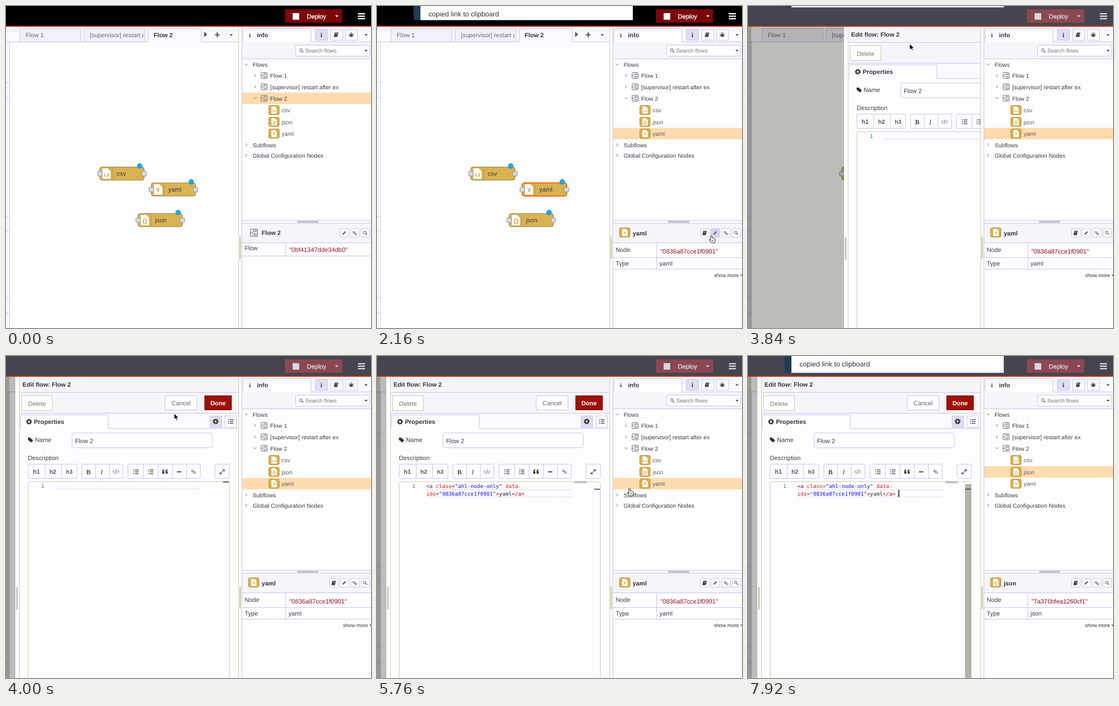
These frames come from a looping animation (666x588 px, 8 s). An HTML page:

```html
<!DOCTYPE html>
<html lang="en">
<head>
<meta charset="utf-8">
<title>Flow editor</title>
<style>
html, body { margin: 0; width: 100%; height: 100%; overflow: hidden; background: #fdfdff; }
svg { display: block; }
text { font-family: "Liberation Sans", Arial, sans-serif; white-space: pre; text-rendering: geometricPrecision; }
.mono { font-family: "DejaVu Sans Mono", monospace; }
.serif { font-family: "Liberation Serif", serif; }
</style>
</head>
<body>
<script>
const LINE = '#c6c4f0', OLIVE = '#cdcda6', BAR = '#f5f5fc', PAPER = '#fdfdff', INK = '#3c3c48', AMBER = '#d9b252';

// Drawing helpers, each returns SVG markup
const rect = (x, y, w, h, fill, stroke = 'none', rx = 0, more = '') =>
  `<rect x="${x}" y="${y}" width="${w}" height="${h}" fill="${fill}" stroke="${stroke}" rx="${rx}" ${more}/>`;
const text = (x, y, s, size = 11.2, fill = INK, more = '') =>
  `<text x="${x}" y="${y}" font-size="${size}" fill="${fill}" ${more}>${s}</text>`;
const bold = (x, y, s, size = 11.2, fill = '#333340', more = '') => text(x, y, s, size, fill, 'font-weight="bold" ' + more);
const line = (d, stroke = LINE, w = 1, more = '') => `<path d="${d}" fill="none" stroke="${stroke}" stroke-width="${w}" ${more}/>`;
const shape = (d, fill = INK) => `<path d="${d}" fill="${fill}"/>`;
const group = (id, ...parts) => `<g id="${id}">${parts.join('')}</g>`;
const at = (x, y, ...parts) => `<g transform="translate(${x} ${y})">${parts.join('')}</g>`;
const MID = 'text-anchor="middle"';

const caretDown = (x, y, fill = '#555') => shape(`M${x - 3} ${y - 1.5}h6l-3 3.5z`, fill);
const chevron = (x, y, open) => line(open ? `M${x - 2.5} ${y - 1.5}l2.5 2.5l2.5-2.5` : `M${x - 1.5} ${y - 2.5}l2.5 2.5l-2.5 2.5`, '#666');
const lens = (x, y) => `<circle cx="${x}" cy="${y}" r="2.5" fill="none" stroke="#555"/>` + line(`M${x + 2} ${y + 2}l2.5 2.5`, '#555', 1.3);
const book = (x, y) => shape(`M${x - 2.5} ${y - 4}h6.5l-2 8h-6.5z`, '#444') + line(`M${x - 1} ${y - 1.5}h3.5`, '#fff', .8);
const pencil = (x, y) => line(`M${x - 2.5} ${y + 2.5}l5-5`, '#444', 2);
const link = (x, y) => rect(x - 3.5, y - 3, 3.4, 3.4, 'none', '#555', 1.5) + rect(x + .3, y + .2, 3.4, 3.4, 'none', '#555', 1.5) + line(`M${x - 1} ${y - .7}l2.2 2`, '#555');
const bullets = (x, y) => [-3.5, 0, 3.5].map(d => line(`M${x - 5} ${y + d}h1.8m1.4 0h6.8`, '#555', 1.4)).join('');
const gear = (x, y) => `<circle cx="${x}" cy="${y}" r="3" fill="none" stroke="#333" stroke-width="2.2"/>` +
  `<circle cx="${x}" cy="${y}" r="4.5" fill="none" stroke="#333" stroke-width="1.6" stroke-dasharray="1.8 1.73"/>`;
const flowIcon = (x, y, s = 1) => `<g transform="translate(${x} ${y}) scale(${s})">` +
  rect(-5.5, -5.5, 11, 11, 'none', '#6a6a72', 1) +
  line('M0-3.5h3.5v2h-3.5zM0 1.5h3.5v2h-3.5zM-5.5 0h2q1.5 0 1.5-1.5q0-1 2-1M-3.5 0q1.5 0 1.5 1.5q0 1 2 1', '#6a6a72', .8) + '</g>';
const GLYPH = { csv: '1,2', json: '{}', yaml: 'Y' };
const sheet = (x, y, w, h, type) => shape(`M${x} ${y}h${w * .65}l${w * .35} ${h * .28}v${h * .72}h${-w}z`, '#fff') +
  bold(x + w / 2, y + h * .75, GLYPH[type], h * (type == 'csv' ? .42 : .58), '#c09a38', MID);
const typeIcon = (x, y, type) => rect(x - 9.5, y - 8.5, 19, 17, AMBER, '#b8933c', 2.5) + sheet(x - 4.5, y - 6.5, 9.5, 13, type);

function node(x, y, type) {
  const port = px => rect(px, 8, 8.5, 8.5, '#d9d9dc', '#8f8f98', 2);
  return at(x, y, rect(0, 0, 81, 24, AMBER, '#8f7c45', 4, `id="node-${type}"`),
    line('M23.5 0v24', '#a98b3c', 1, 'stroke-dasharray="2 1"'), sheet(5, 2.5, 15, 19, type),
    port(-4), port(76.5), text(31, 16, type, 11.4),
    '<circle cx="73" cy="-2" r="4.2" fill="#00b4ff" stroke="#2378b4"/>');
}

const header = rect(0, 0, 666, 37, '#000') +
  rect(509, 6, 104.5, 24.5, '#7c0507', 'none', 1) + rect(587, 6, 1, 24.5, '#650406') +
  rect(523, 13, 12, 12, '#fff') + text(549, 22.5, 'Deploy', 11.3, '#fff', 'stroke="#fff" stroke-width=".35"') +
  caretDown(603.5, 18.5, '#fff') + [13, 17.5, 22].map(y => rect(642, y, 13, 2.3, '#fff')).join('');

const workspace = rect(0, 38, 424, 550, PAPER) + rect(0, 66, 6, 522, '#f8f8fd') +
  line('M6.5 66V588M0 139.5h6M0 167.5h6M0 384.5h6M0 410.5h6M0 532.5h6M0 560.5h6', '#c9c9f2') +
  rect(0, 38, 424, 27, '#fafaff') +
  rect(25.5, 41.5, 111, 24, '#f1f1fb', LINE) + text(36, 57, 'Flow 1', 11.2, '#686876') +
  rect(142.5, 41.5, 111, 24, '#f1f1fb', LINE) +
  `<svg x="142" y="41" width="109" height="25">${text(11, 16, '[supervisor] restart after', 11.1, '#686876')}</svg>` +
  line('M0 65.5H259.5V41.5H356.5V65.5H424') + bold(269.5, 57, 'Flow 2') +
  shape('M361.5 47l5.5 5l-5.5 5z', '#555') + line('M381 52.5h9M385.5 48v9', '#555', 2.2) + caretDown(411, 53) +
  node(171, 294, 'csv') + node(265, 323, 'yaml') + node(241, 379, 'json');

const dim = group('dim', rect(0, 38, 424, 550, '#141400', 'none', 0, 'opacity=".28"'), rect(0, 38, 6, 550, '#141400', 'none', 0, 'opacity=".2"'));

const field = (x, w, cells, draw) =>
  rect(x + .5, 197.5, w, 26, PAPER, LINE, 1) + cells.map(c => line(`M${c + .5} 197.5v26`)).join('') + draw;
const quote = x => shape(`M${x} 211q0-4 4-4v1.5q-2 .4-2 2h2v4.5h-4z`, '#444');
const tools = field(40, 89, [71, 101], ['h1', 'h2', 'h3'].map((h, i) => bold(55.5 + 30 * i, 215, h, 11 - .4 * i, '#555', MID)).join('')) +
  field(138, 75, [163, 188], text(150.5, 215.5, 'B', 12, '#444', MID + ' class="serif" font-weight="bold"') +
    text(174.5, 215.5, 'I', 12.5, '#444', MID + ' class="serif" font-style="italic"') + line('M198 208.5l-3 3l3 3M203 208.5l3 3l-3 3M201.5 207.5l-2 8', '#555')) +
  field(222, 132, [250, 277, 303, 329], bullets(237, 211.5) + bullets(264, 211.5) +
    quote(285) + quote(291) + line('M312 211.5h8', '#444', 2) + link(342, 211)) +
  field(381, 26, [], line('M391 215l7-7M395 207.5h3.5v3.5M390.5 212v3.5h3.5', '#555', 1.1));

const RED = '#dc1414', BLUE = '#1414e6';
const span = (s, c) => `<tspan fill="${c}">${s}</tspan>`;
const mono = (y, s) => text(90, y, s, 9.6, '#8a0c14', 'class="mono"');
const dash = (...ys) => ys.map(y => line(`M91 ${y}H355`, LINE, 1, 'stroke-dasharray="3 1.5"')).join('');
const code = mono(240.5, '&lt;a ' + span('class', RED) + span('=', '#333') + span('"ahl-node-only"', BLUE) + ' ' + span('data-', RED)) +
  mono(254.5, span('ids', RED) + span('=', '#333') + span('"0836a87cce1f0901"', BLUE) + '&gt;' + span('yaml', '#222') + '&lt;/a&gt;');

const tray = rect(17, 38, 408, 550, PAPER) + line('M24.5 38V588', OLIVE) + rect(18.5, 422, 3, 41, '#c4c4c4', 'none', 1) +
  rect(25, 38, 399, 66, BAR) + line('M24 66.5H424M24 104.5H424') + bold(30, 56, 'Edit flow: Flow 2') +
  rect(28.5, 72.5, 56, 27, PAPER, OLIVE) + text(56.5, 90.5, 'Delete', 11.2, '#777', MID) +
  rect(290.5, 72.5, 58, 26, PAPER, LINE) + text(319.5, 90, 'Cancel', 11.2, '#666', MID) +
  rect(362, 72, 50, 27, '#9c1008') + bold(387, 90, 'Done', 11.2, '#fff', MID) +
  rect(25, 105, 399, 27, '#fafaff') + shape('M26 132V107H186V133H26z', PAPER) + line('M26.5 132.5V107.5H186.5V132.5H424') +
  gear(42, 120) + bold(51, 124, 'Properties') +
  rect(372.5, 109.5, 21, 21, '#dedef0', LINE) + gear(382.5, 119.5) + rect(399.5, 109.5, 21, 21, PAPER, LINE) + bullets(410, 119.5) +
  shape('M40 149h4l5.5 5l-3.5 4l-6-5z', '#333') + text(53, 157, 'Name') +
  rect(120.5, 140.5, 256, 27, PAPER, LINE, 3) + text(126, 158.5, 'Flow 2') + text(40, 190, 'Description') + tools +
  rect(40.5, 229.5, 367, 380, PAPER, OLIVE, 4) + text(64, 240.5, '1', 9.6, '#237893', 'class="mono"') +
  group('empty', dash(229.5, 243), rect(396, 229, 11, 2, '#555560')) +
  group('filled', dash(244.5, 257.5), code,
    rect(360, 229, 23, 1, '#7c7cc0') + rect(360, 231, 23, 1, '#a89060'),
    rect(396, 234, 11, 354, '#b3b3ac', 'none', 0, 'id="scroll"'), rect(396, 242.5, 11, 1.5, '#45453c')) +
  rect(0, 0, 1.5, 13, '#000', 'none', 0, 'id="caret"');

const tabButton = (x, on, icon) => rect(x + .5, 42.5, 22, 20, on ? '#dedef2' : PAPER, LINE) + icon;
const row = (y, open, label) => chevron(454.5, y, open) + flowIcon(471, y) + text(482, y + 4, label, 10.5);
const leaf = (y, type) => typeIcon(489, y, type) + text(503, y + 4, type, 10.5, '#5c5c68');
const smallButton = (id, x, icon) => group(id, rect(x + .5, 406.5, 15.5, 15.5, PAPER, '#c9c9dc', 1), icon(x + 8, 414.5));

const detail = (type, hash) => group('detail-' + type,
  typeIcon(452, 413.5, type), bold(466.5, 419, type), smallButton('read-' + type, 590, book),
  line('M431 459.5H666M431 480.5H666M510.5 433V480'),
  text(435.5, 449, 'Node'), text(517, 452, `"${hash}"`, 11.4, '#9c1020'),
  text(435.5, 474, 'Type'), text(515.5, 474, type), text(615, 495, 'show more', 9.3, '#333'), caretDown(666, 492));

const sidebar = rect(424, 38, 242, 550, PAPER) + line('M424.5 38V588', OLIVE) + line('M430.5 38V588') + rect(426, 421, 2.5, 41, '#c9c9a6', 'none', 1) +
  rect(431, 38, 235, 27, '#fafaff') + shape('M432 66V41h124v25z', PAPER) + line('M432.5 65.5V41.5H556.5V65.5H666') +
  bold(443.5, 57, 'i', 11, '#333', 'class="serif"') + bold(458, 57, 'info', 11) +
  tabButton(564, true, bold(575.5, 57, 'i', 12, '#333', MID + ' class="serif"')) + tabButton(592, false, book(602.5, 52.5)) +
  tabButton(619, false, shape('M627.5 51h5v4q-2.5 3-5 0zM628 50q2-3.5 4 0z', '#444') + line('M625.5 50l9 6M634.5 50l-9 6M625 53h10', '#444', .8)) + caretDown(657, 53) +
  rect(431, 66, 235, 30, BAR) + line('M431 96.5H666') + rect(528.5, 71.5, 135, 20, PAPER, LINE, 2) +
  lens(538, 80.5) + text(546, 85, 'Search flows', 10, '#777') + caretDown(657, 81.5) +
  rect(431, 0, 235, 21, '#ffdcae', 'none', 0, 'id="mark"') +
  chevron(438.5, 107, true) + text(450, 111, 'Flows', 10.5) + row(127, false, 'Flow 1') + row(147.5, false, '[supervisor] restart after ex') + row(168.5, true, 'Flow 2') +
  leaf(190, 'csv') + leaf(211.5, 'json') + leaf(233, 'yaml') +
  chevron(438.5, 253.5, false) + text(450, 257.5, 'Subflows', 10.5) + chevron(438.5, 272.5, false) + text(450, 276.5, 'Global Configuration Nodes', 10.5) +
  line('M431 391.5H666M431 396.5H666') + rect(531, 392.5, 39, 3, '#bcbcbc', 'none', 1) +
  rect(431, 397, 235, 35, BAR) + line('M431 432.5H666') +
  smallButton('edit', 609, pencil) + smallButton('copy', 628.5, link) + smallButton('find', 647.5, (x, y) => lens(x - 1, y - 1)) +
  group('detail-flow', flowIcon(452.5, 414, 1.15), bold(466.5, 418, 'Flow 2'), line('M431 456.5H666M510.5 433V456'),
    text(435.5, 446, 'Flow'), text(517, 449, '"0bf41347dde34db0"', 11.4, '#9c1020')) +
  detail('yaml', '0836a87cce1f0901') + detail('json', '7a376bfea1260cf1');

const note = group('note', rect(67, -4, 13, 35, '#1f3c50', 'none', 0, 'class="card"'),
  rect(79.5, -4, 387, 34.5, PAPER, LINE, 0, 'class="card"'), text(94, 18.5, 'copied link to clipboard', 12.65, '#333'));

const pointers = group('pointer',
  group('arrow', '<path d="M0 0v11l2.6-2.4l1.8 4l1.8-.8l-1.8-3.9h3.5z" fill="#000" stroke="#fff" stroke-width=".8"/>'),
  group('hand', '<path d="M-1.3 1q1.3-2 2.6 0v4q1.4-1 2 .3q1.3-.8 2 .5q1.4-.3 1.7 1v3.2l-1.2 3.5h-5.5l-3.5-4.5q-1.2-2 .4-2l1.5 1.5z" fill="#fff" stroke="#222"/>' + line('M1.3 8v3M3.3 8v3', '#222', .8)),
  group('beam', line('M-2.5-6q2.5 0 2.5 2v8q0 2-2.5 2M2.5-6q-2.5 0-2.5 2v8q0 2 2.5 2M-1.5 1h3', '#222')));

document.body.innerHTML = `<svg width="666" height="588" viewBox="0 0 666 588">${
  workspace + dim + group('tray', tray) + sidebar + header +
  rect(0, 0, 666, 37, '#a0a0b4', 'none', 0, 'id="shade" opacity=".43"') + rect(0, 36, 666, 2, '#c8361c') + note + pointers}</svg>`;

const LOOP = 8000, STEP = 80;
const PICK_YAML = 1040, PICK_JSON = 6160, OPEN = 3680, FOCUS = 4560, PASTE = 4800, REFOCUS = 7680, SPACE = 7840;
// time, x, y of the mouse
const PATH = [[80, 400, 560], [800, 306, 340], [1040, 306, 340], [1680, 636, 416], [1920, 636, 416], [2160, 610, 419],
  [2720, 606, 413], [3440, 291, 57], [3760, 291, 57], [4000, 307, 105], [4480, 310, 337], [5440, 310, 337],
  [5920, 511, 210], [6240, 511, 210], [6560, 664, 419], [6880, 637, 415], [7200, 637, 415], [7680, 300, 330], [8000, 300, 330]];
const $ = id => document.getElementById(id);
const show = (id, on) => $(id).style.display = on ? '' : 'none';
const move = (id, x, y) => $(id).setAttribute('transform', `translate(${x} ${y})`);
const ramp = (t, from, to) => Math.min(1, Math.max(0, (t - from) / (to - from)));
const ease = u => (1 - Math.cos(Math.PI * u)) / 2;
const cards = document.querySelectorAll('.card');

function mouse(t) {
  const i = Math.max(1, PATH.findIndex(k => k[0] >= t));
  const [a, b] = [PATH[i - 1], PATH[i]], u = ease(ramp(t, a[0], b[0]));
  return [a[1] + (b[1] - a[1]) * u, a[2] + (b[2] - a[2]) * u];
}

function render(t) {
  const picked = t < PICK_YAML ? 'flow' : t < PICK_JSON ? 'yaml' : 'json';
  for (const k of ['flow', 'yaml', 'json']) show('detail-' + k, k == picked);
  $('mark').setAttribute('y', { flow: 158, yaml: 222.5, json: 201 }[picked]);
  $('node-yaml').setAttribute('stroke', picked == 'yaml' ? '#ff6a14' : '#8f7c45');
  $('node-yaml').setAttribute('stroke-width', picked == 'yaml' ? 2 : 1);

  const slide = ease(ramp(t, OPEN, OPEN + 280)), open = slide > 0;
  show('tray', open); show('dim', open); show('shade', open);
  move('tray', 407 * (1 - slide), 0);

  const down = ramp(t, 1920, 2080) - ramp(t, 3680, 3920) + ramp(t, 7120, 7360);
  show('note', down > 0);
  move('note', 0, -35 * (1 - down));
  for (const c of cards) c.setAttribute('height', t < PASTE ? 29.5 : 34.5);

  const [x, y] = mouse(t), seen = t >= 80 && t < SPACE;
  const inCode = slide == 1 && x > 40 && x < 408 && y > 229;
  const over = left => seen && y > 405 && y < 424 && x >= left && x < left + 16;
  const hot = { edit: over(609), copy: over(628.5), find: over(647.5) };
  for (const id in hot) $(id).firstChild.setAttribute('fill', hot[id] ? '#d4d4ee' : PAPER);
  const hand = hot.edit || hot.copy || hot.find || !open && y < 66 || x > 431 && y > 97 && y < 280;
  show('pointer', seen);
  show('beam', inCode); show('hand', !inCode && hand); show('arrow', !inCode && !hand);
  move('pointer', x, y);

  const pasted = t >= PASTE;
  show('empty', !pasted); show('filled', pasted); show('scroll', inCode);
  const since = t - [FOCUS, PASTE, REFOCUS, SPACE].filter(k => k <= t).pop();
  show('caret', t >= FOCUS && (t < PICK_JSON || t >= REFOCUS) && since % 1000 < 500);
  move('caret', pasted ? (t >= SPACE ? 274.5 : 268.7) : 91, pasted ? 244.5 : 230.5);
}

const start = performance.now();
function tick(now) {
  const t = Math.max(0, now - start) % LOOP;
  render(Math.floor(t / STEP) * STEP);
  requestAnimationFrame(tick);
}
render(0);
requestAnimationFrame(tick);
</script>
</body>
</html>
```
